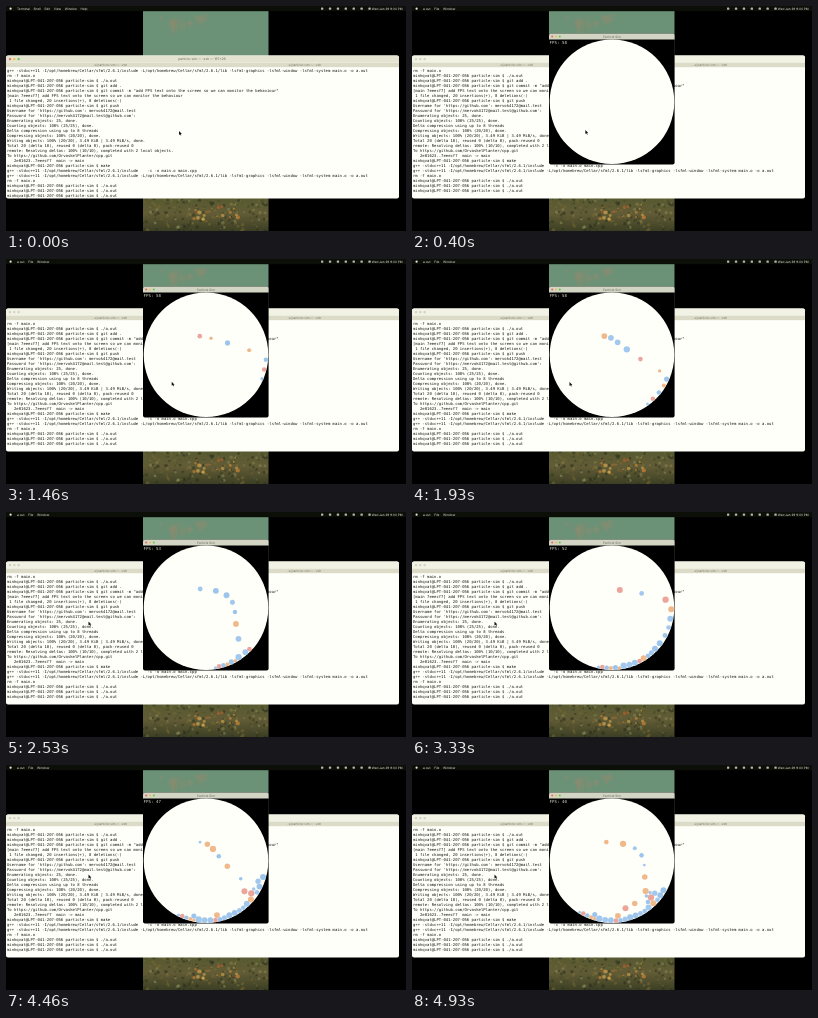
These frames come from a looping animation (400x225 px, 5000 ms). An HTML page with a canvas:

```html
<!DOCTYPE html>
<html lang="en">
<head>
<meta charset="utf-8">
<title>Particle simulation</title>
<style>
html, body { margin: 0; width: 100%; height: 100%; overflow: hidden; background: #000; }
canvas { display: block; width: 400px; height: 225px; }
</style>
</head>
<body>
<canvas id="stage"></canvas>
<script>
const W = 400, H = 225, LOOP = 5000, FPS = 15;
const canvas = document.getElementById('stage');
const scale = window.devicePixelRatio || 1;
canvas.width = W * scale;
canvas.height = H * scale;
const ctx = canvas.getContext('2d');
const MONO = '"DejaVu Sans Mono", "Liberation Mono", monospace';
const SANS = 'Inter, "Liberation Sans", sans-serif';
const PAPER = '#fffffa', LIGHT = '#e6e6dc';

const SCROLL_AT = 0.06, OPEN_AT = 0.26;
const BOWL = { x: 200, y: 95.8, r: 62.3 };
const SPAWN = { x: 191, y: 77, first: 0.709, every: 0.12 };
const GRAVITY = 180, STEP = 1 / 240;
const COLORS = ['#eba59b', '#9dc5ec', '#f0b98c', '#a3c8ee'];

function random(seed) {
  return () => {
    seed = (seed * 16807) % 2147483647;
    return seed / 2147483647;
  };
}

function rect(x, y, w, h, fill) {
  ctx.fillStyle = fill;
  ctx.fillRect(x, y, w, h);
}

function round(x, y, w, h, r, fill) {
  ctx.fillStyle = fill;
  ctx.beginPath();
  ctx.roundRect(x, y, w, h, r);
  ctx.fill();
}

function disc(x, y, r, fill) {
  ctx.fillStyle = fill;
  ctx.beginPath();
  ctx.arc(x, y, r, 0, Math.PI * 2);
  ctx.fill();
}

function text(str, x, y, size, fill, family = SANS, align = 'left') {
  ctx.font = size + 'px ' + family;
  ctx.textAlign = align;
  ctx.fillStyle = fill;
  ctx.fillText(str, x, y);
}

let balls, ticks, rnd;

function reset() {
  balls = [];
  ticks = 0;
  rnd = random(4021);
}

// Balls leave sideways; the launch speed swings back and forth.
function launch(t) {
  const speed = 120 + 65 * Math.cos((t - 2.9) * Math.PI * 2 / 2.35);
  balls.push({
    x: SPAWN.x, y: SPAWN.y, px: SPAWN.x - speed * STEP, py: SPAWN.y,
    r: 1.2 + 2 * Math.sqrt(rnd()),
    color: COLORS[Math.floor(rnd() * COLORS.length)]
  });
}

function tick() {
  const now = ticks * STEP, due = SPAWN.first + balls.length * SPAWN.every;
  if (now >= due) launch(due);
  for (const b of balls) {
    const vx = b.x - b.px, vy = b.y - b.py;
    b.px = b.x;
    b.py = b.y;
    b.x += vx;
    b.y += vy + GRAVITY * STEP * STEP;
  }
  for (let i = 0; i < balls.length; i++) {
    for (let j = 0; j < i; j++) separate(balls[i], balls[j]);
  }
  balls.forEach(contain);
  ticks++;
}

function calm(b, amount) {
  b.px += (b.x - b.px) * amount;
  b.py += (b.y - b.py) * amount;
}

function separate(a, b) {
  const dx = a.x - b.x, dy = a.y - b.y, d = Math.hypot(dx, dy), gap = a.r + b.r - d;
  if (gap <= 0 || d < .001) return;
  const ma = a.r * a.r, mb = b.r * b.r, k = .4 * gap / d / (ma + mb);
  a.x += dx * k * mb;
  a.y += dy * k * mb;
  b.x -= dx * k * ma;
  b.y -= dy * k * ma;
  calm(a, .012);
  calm(b, .012);
}

function contain(b) {
  const dx = b.x - BOWL.x, dy = b.y - BOWL.y, d = Math.hypot(dx, dy), max = BOWL.r - b.r;
  if (d <= max) return;
  b.x = BOWL.x + dx / d * max;
  b.y = BOWL.y + dy / d * max;
  calm(b, .01);
}

function simulate(t) {
  const goal = Math.round(t / STEP);
  if (goal < ticks) reset();
  while (ticks < goal) tick();
}

const prompt = 'minhqvat@LPT-041-207-056 particle-sim $ ';
const brew = '/opt/homebrew/Cellar/sfml/2.6.1/';
const compile = 'g++ -std=c++11 -I' + brew + 'include ';
const link = compile + '-L' + brew + 'lib -lsfml-graphics -lsfml-window -lsfml-system main.o -o a.out';
const note = 'add FPS text onto the screen so we can monitor the behaviour';
const mail = 'mervok4172@mail.test';
const run = prompt + './a.out';
const lines = [
  link, 'rm -f main.o', run,
  prompt + 'git add .',
  prompt + 'git commit -m "' + note + '"',
  '[main 7eeecf7] ' + note,
  ' 1 file changed, 20 insertions(+), 8 deletions(-)',
  prompt + 'git push',
  "Username for 'https://github.com': " + mail,
  "Password for 'https://" + mail + "@github.com':",
  'Enumerating objects: 25, done.',
  'Counting objects: 100% (25/25), done.',
  'Delta compression using up to 8 threads',
  'Compressing objects: 100% (20/20), done.',
  'Writing objects: 100% (20/20), 3.49 KiB | 3.49 MiB/s, done.',
  'Total 20 (delta 10), reused 0 (delta 0), pack-reused 0',
  'remote: Resolving deltas: 100% (10/10), completed with 2 local objects.',
  'To https://github.com/OrvaskelPlanter/cpp.git',
  '   2e01623..7eeecf7  main -> main',
  prompt + 'make',
  compile + '   -c -o main.o main.cpp',
  link, 'rm -f main.o', run, run, run
];

function lights(x, y, gap, r, active) {
  const fills = active ? ['#ec6a5e', '#f4bf4f', '#61c554'] : ['#cfcfc2', '#cfcfc2', '#cfcfc2'];
  fills.forEach((f, i) => disc(x + i * gap, y, r, f));
}

// Scatters soft dots in a box.
function scatter(seed, count, x, y, w, h, size, tones) {
  const next = random(seed);
  for (let i = 0; i < count; i++) {
    disc(x + next() * w, y + next() * h, .4 + next() * size, tones[i % tones.length]);
  }
}

function wallpaper() {
  ctx.save();
  ctx.beginPath();
  ctx.rect(137, 0, 125.5, H);
  ctx.clip();
  rect(137, 0, 126, 60, '#6b9277');
  const g = ctx.createLinearGradient(0, 190, 0, H);
  g.addColorStop(0, '#55592f');
  g.addColorStop(.5, '#625c36');
  g.addColorStop(1, '#3c3f24');
  rect(137, 190, 126, 35, g);
  ctx.globalAlpha = .2;
  scatter(31, 26, 155, 11, 48, 16, 4, ['#a8806c', '#95866c']);
  ctx.globalAlpha = .5;
  scatter(59, 220, 137, 192, 126, 33, 1.4, ['#2d331c', '#8a8a58', '#454a2a', '#7b6a34', '#24291a']);
  ctx.globalAlpha = .6;
  scatter(83, 30, 188, 197, 44, 17, 1.7, ['#d08a3a', '#b8632f', '#d9a84c']);
  ctx.restore();
}

function menuBar(open) {
  rect(0, 0, W, 5.2, '#0c0e08');
  disc(4.6, 2.7, 1.1, LIGHT);
  let x = 11;
  const items = open ? ['a.out', 'File', 'Window'] : ['Terminal', 'Shell', 'Edit', 'View', 'Window', 'Help'];
  items.forEach((s, i) => {
    text(s, x, 3.8, 3.2, LIGHT, i ? SANS : 'bold ' .slice(5) + SANS);
    x += ctx.measureText(s).width + 3.6;
  });
  for (let i = 0; i < 7; i++) round(315 + i * 7.9, 1.6, 2.3, 2.2, .6, '#b4b4aa');
  text('Wed Jan 29 9:00 PM', 396.5, 3.8, 3.1, LIGHT, SANS, 'right');
}

function terminal(t, open) {
  round(0, 49.6, 393, 143, 2, PAPER);
  round(0, 49.6, 393, 7, [2, 2, 0, 0], open ? '#f1f1e4' : '#e4e3d2');
  rect(0, 56.6, 393, 4.6, '#dcdbc8');
  lights(4, 53.1, 4.3, 1.2, !open);
  text('particle-sim — -zsh — 167×26', 196, 54.2, 3.3, '#66665a', SANS, 'center');
  for (const x of [104, 298]) text('..s/particle-sim — -zsh', x, 60.1, 3.2, '#77776a', SANS, 'center');
  const skip = t >= SCROLL_AT ? 1 : 0;
  lines.slice(skip).forEach((s, i) => text(s, 1, 66.4 + i * 5, 3.9, '#15150e', MONO));
}

// Value of the last [time, value] point reached.
const fpsSteps = [[0, 58], [2.4, 53], [2.9, 52], [3.7, 47], [4.5, 40]];
const fpsAt = t => fpsSteps.filter(p => p[0] <= t).pop()[1];

function simWindow(t) {
  round(137, 27.4, 125.6, 131.2, 2, '#000');
  round(137, 27.4, 125.6, 6, [2, 2, 0, 0], '#d3d5c4');
  lights(140.2, 30.4, 3.8, 1, true);
  text('Particle Sim', 200, 31.5, 3.2, '#6a6c60', SANS, 'center');
  disc(BOWL.x, BOWL.y, BOWL.r, PAPER);
  text('FPS: ' + fpsAt(t), 137.6, 38.4, 4.1, '#d6d8c8', MONO);
  balls.forEach(b => disc(b.x, b.y, b.r, b.color));
}

// [time, x, y]
const pointerPath = [[0, 173, 125], [1, 174, 122.5], [1.93, 157.5, 123], [2.45, 82.5, 109.5], [5, 82.5, 109.5]];

function pointer(t) {
  const i = pointerPath.findIndex(p => p[0] > t);
  const [t0, x0, y0] = pointerPath[i - 1], [t1, x1, y1] = pointerPath[i];
  const u = (t - t0) / (t1 - t0), k = u * u * (3 - 2 * u);
  ctx.save();
  ctx.translate(x0 + (x1 - x0) * k, y0 + (y1 - y0) * k);
  const arrow = new Path2D('M0 0V4L1 3.2L1.7 4.6L2.3 4.3L1.7 3L2.9 2.9Z');
  ctx.lineWidth = .7;
  ctx.strokeStyle = '#fff';
  ctx.stroke(arrow);
  ctx.fillStyle = '#111';
  ctx.fill(arrow);
  ctx.restore();
}

function draw(ms) {
  const t = Math.floor((ms % LOOP + 7) * FPS / 1000) / FPS % (LOOP / 1000);
  const open = t >= OPEN_AT;
  simulate(t);
  ctx.setTransform(scale, 0, 0, scale, 0, 0);
  ctx.textRendering = 'geometricPrecision';
  rect(0, 0, W, H, '#000');
  wallpaper();
  menuBar(open);
  terminal(t, open);
  if (open) simWindow(t);
  pointer(t);
}

reset();
const begin = performance.now();
function frame() {
  draw(performance.now() - begin);
  requestAnimationFrame(frame);
}
frame();
</script>
</body>
</html>
```
